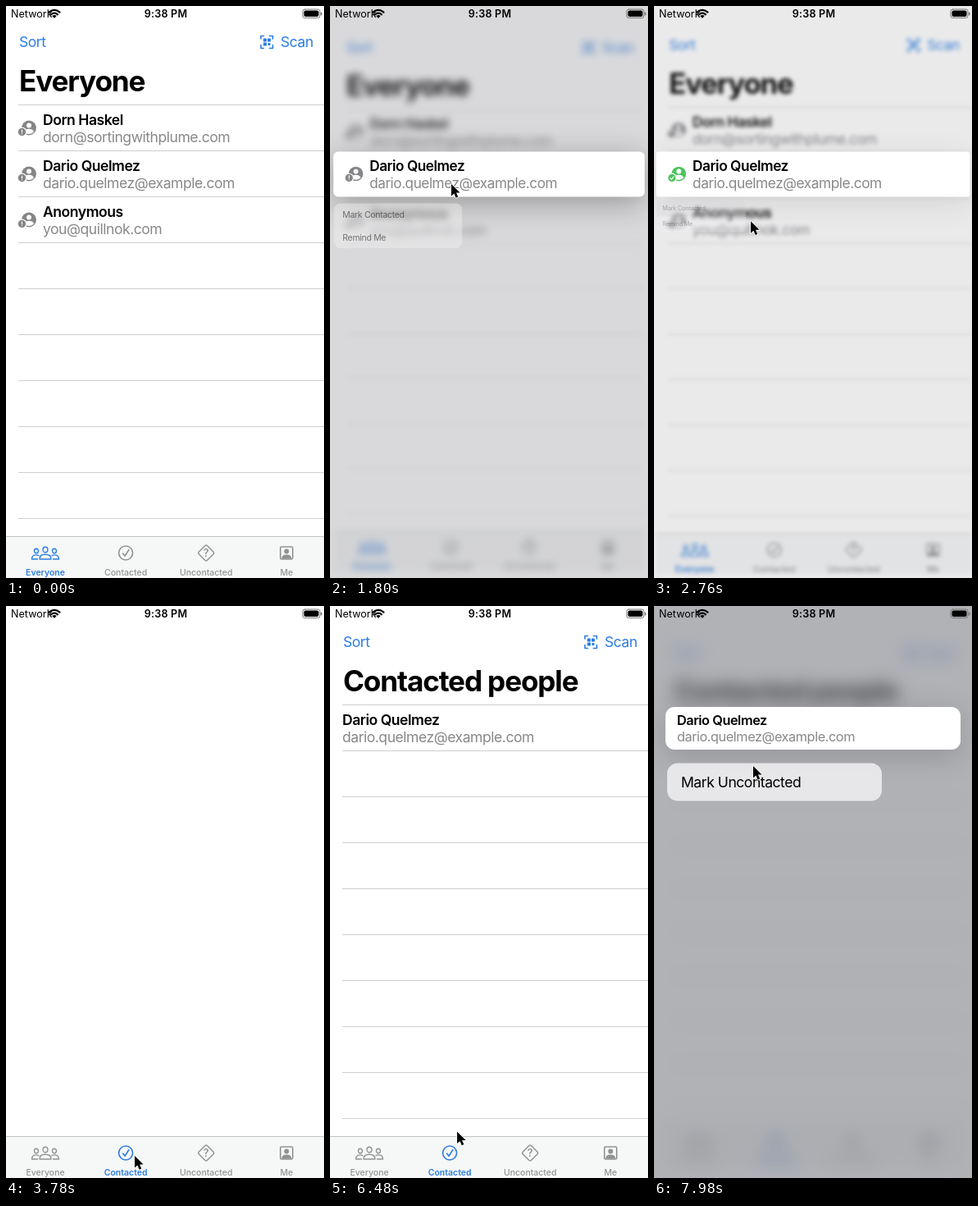
These frames come from a looping animation (388 px wide and 697 px high, 8 s). An HTML page with a canvas:

```html
<!DOCTYPE html>
<html lang="en">
<head>
<meta charset="utf-8">
<title>Contact list</title>
<style>
  html, body { margin: 0; width: 100%; height: 100%; overflow: hidden; background: #fff; }
  canvas { display: block; }
</style>
</head>
<body>
<canvas id="stage" width="388" height="697"></canvas>
<script>
const W = 388, H = 697, LOOP = 8000;
const BLUE = '#2b7de1', GREY = '#929294', GREEN = '#4cc35f';
const ROW_TOP = 121, ROW_H = 56;

const stage = document.getElementById('stage').getContext('2d');
const page = document.createElement('canvas');
page.width = W;
page.height = H;
const pageCtx = page.getContext('2d');
let c = stage;

const dorn = { name: 'Dorn Haskel', mail: 'dorn@sortingwithplume.com' };
const dario = { name: 'Dario Quelmez', mail: 'dario.quelmez@example.com' };
const anonymous = { name: 'Anonymous', mail: 'you@quillnok.com' };

const screens = {
  everyone: { tab: 0, title: 'Everyone', people: [dorn, dario, anonymous], icons: true },
  contacted: { tab: 1, title: 'Contacted people', people: [dario] },
  uncontacted: { tab: 2, title: 'Uncontacted people', people: [dorn, anonymous] }
};

// Time, x and y of the pointer tip
const pointerPath = [
  [300, 170, 720], [1000, 148, 217], [1950, 148, 217], [2380, 118, 262],
  [2750, 118, 262], [3400, 157, 670], [4250, 157, 670], [4600, 201, 667],
  [6000, 201, 667], [6250, 157, 669], [6420, 157, 669], [6850, 122, 147],
  [7520, 122, 147], [7880, 121, 195]
];
const holds = [[1250, 1740], [2450, 2545], [3670, 3765], [4600, 4695], [6200, 6295], [6930, 7400]];

const lerp = (a, b, p) => a + (b - a) * p;
const ramp = (t, a, b) => Math.min(1, Math.max(0, (t - a) / (b - a)));
const smooth = p => p * p * (3 - 2 * p);
const easeOut = p => 1 - (1 - p) ** 3;

function text(str, x, y, size, { weight = 400, color = '#000', track = -0.028, align = 'left' } = {}) {
  c.font = `${weight} ${size}px Inter, sans-serif`;
  c.letterSpacing = `${track * size}px`;
  c.textAlign = align;
  c.fillStyle = color;
  c.fillText(str, x, y);
}

function box(x, y, w, h, r, color) {
  c.beginPath();
  c.roundRect(x, y, w, h, r);
  c.fillStyle = color;
  c.fill();
}

function disc(x, y, r, color) {
  c.beginPath();
  c.arc(x, y, r, 0, 7);
  c.fillStyle = color;
  c.fill();
}

function stroke(d, color, width = 1.5) {
  c.strokeStyle = color;
  c.lineWidth = width;
  c.lineCap = c.lineJoin = 'round';
  c.stroke(new Path2D(d));
}

function fill(d, color) {
  c.fillStyle = color;
  c.fill(new Path2D(d));
}

// Runs a drawing with its own origin and scale
function at(x, y, scale, draw) {
  c.save();
  c.translate(x, y);
  c.scale(scale, scale);
  draw();
  c.restore();
}

function statusBar() {
  text('Network', 6, 14, 12.6, { track: 0 });
  text('9:38 PM', 195, 14, 12.6, { weight: 600, track: 0.015, align: 'center' });
  stroke('M52.5 7.6Q59 2 65.5 7.6M55 10.4Q59 7 63 10.4', '#000', 2.2);
  fill('M56.4 12Q59 10 61.6 12L59 15Z', '#000');
  stroke('M364.5 4H380.5Q383 4 383 6.5V12Q383 14.5 380.5 14.5H364.5Q362 14.5 362 12V6.5Q362 4 364.5 4', '#777', 1);
  box(363.5, 5.5, 18, 7.5, 2, '#000');
  box(384, 7.5, 1.5, 4, 1, '#777');
}

function personIcon(contacted) {
  const color = contacted ? GREEN : '#858587';
  disc(28, 27.5, 9, color);
  disc(28, 24.5, 3, '#fff');
  fill('M22 32.5Q23 28.8 28 28.8Q33 28.8 34 32.5Q31 35 28 35Q25 35 22 32.5Z', '#fff');
  disc(19.5, 32.5, 5.9, '#fff');
  disc(19.5, 32.5, 4.7, color);
  stroke(contacted ? 'M17.4 32.7L19 34.4L21.7 30.8' : 'M19.5 30V32.9M19.5 34.9V35', '#fff', 1.2);
}

// One list row with its own top left corner as origin
function row(person, icons, contacted) {
  const x = icons ? 45 : 15;
  if (icons) personIcon(contacted);
  text(person.name, x, 23.5, 17.6, { weight: 600 });
  text(person.mail, x, 45, 17.6, { color: '#88888b' });
}

const tabIcons = [
  color => {
    for (const x of [-11, 11]) {
      stroke(`M${x - 2.5} -2.5a2.5 2.7 0 1 0 5 0a2.5 2.7 0 1 0 -5 0`, color, 1.4);
    }
    stroke('M-3 -4a3 3.3 0 1 0 6 0a3 3.3 0 1 0 -6 0M-7 7.5Q-7 1.8 0 1.8Q7 1.8 7 7.5Z', color, 1.4);
    stroke('M-9.5 7.5H-16.5Q-16.5 2.4 -11 2.4Q-9 2.4 -8 3.2M9.5 7.5H16.5Q16.5 2.4 11 2.4Q9 2.4 8 3.2', color, 1.4);
  },
  color => stroke('M-8.5 0a8.5 8.5 0 1 0 17 0a8.5 8.5 0 1 0 -17 0M-3.5 .7L-1 3.7L3.7 -3.7', color, 1.6),
  color => {
    stroke('M-1.2 -9Q0 -10 1.2 -9L9 -1.2Q10 0 9 1.2L1.2 9Q0 10 -1.2 9L-9 1.2Q-10 0 -9 -1.2Z', color);
    text('?', 0, 4.5, 12.5, { weight: 600, color, track: 0, align: 'center' });
  },
  color => {
    stroke('M-6 -7.5H6Q7.5 -7.5 7.5 -6V6Q7.5 7.5 6 7.5H-6Q-7.5 7.5 -7.5 6V-6Q-7.5 -7.5 -6 -7.5Z', color, 1.6);
    disc(0, -2, 3, color);
    fill('M-6 7Q-6 2 0 2Q6 2 6 7Z', color);
  }
];

function tabBar(active) {
  box(0, 646, W, 51, 0, '#f6f7f7');
  box(0, 646, W, 1, 0, '#c4c4c6');
  ['Everyone', 'Contacted', 'Uncontacted', 'Me'].forEach((label, i) => {
    const x = 48 + i * 98.1, color = i === active ? BLUE : GREY;
    at(x, 666.5, 1, () => tabIcons[i](color));
    text(label, x, 694, 10.5, { weight: i === active ? 600 : 500, color, track: 0, align: 'center' });
  });
}

function screenPage(screen, blank, lifted, contacted) {
  box(0, 0, W, H, 0, '#fff');
  tabBar(screen.tab);
  if (blank) return;
  text('Sort', 16, 49.5, 17.6, { color: BLUE });
  text('Scan', 335, 49.5, 17.6, { color: BLUE });
  stroke('M311 40V36.5H314.5M321.5 36.5H325.5V40M325.5 47.5V51.5H321.5M314.5 51.5H311V47.5', BLUE, 1.6);
  for (const [x, y] of [[314, 39.5], [319, 39.5], [314, 44.5]]) box(x, y, 4, 4, 0.5, BLUE);
  box(319.5, 45, 3, 3, 0.5, BLUE);
  text(screen.title, 16, 104, 35.2, { weight: 700, track: -0.033 });
  for (let i = 0; i < 10; i++) box(15, 120 + i * ROW_H, W - 15, 1, 0, '#cfcfd1');
  screen.people.forEach((person, i) => {
    if (i === lifted) return;
    at(0, ROW_TOP + i * ROW_H, 1, () => row(person, screen.icons, contacted && person === dario));
  });
}

function menu(items, x, y, p, hover) {
  c.globalAlpha = p;
  at(x, y, lerp(0.2, 1, p), () => {
    const h = items.length * 46;
    box(0, 0, 262, h, 13, 'rgba(242,242,243,.84)');
    if (hover) box(0, 0, 262, 46, [13, 13, 0, 0], 'rgba(0,0,0,.11)');
    if (items.length > 1) box(0, 45.5, 262, 0.7, 0, 'rgba(0,0,0,.1)');
    items.forEach((label, i) => text(label, 17, 29.5 + i * 46, 17.6));
  });
  c.globalAlpha = 1;
}

function liftedRow(screen, index, press, open, contacted) {
  const scale = lerp(lerp(1, 1.028, press), 0.928, open);
  const middle = ROW_TOP + (index + 0.5) * ROW_H;
  const left = W / 2 * (1 - scale), top = middle - ROW_H / 2 * scale;
  at(left, top, scale, () => {
    c.shadowColor = `rgba(0,0,0,${0.42 * press * (1 - 0.6 * open)})`;
    c.shadowBlur = 38;
    c.shadowOffsetY = 8;
    box(0, 0, W, ROW_H, 12 * open, '#fff');
    c.shadowColor = 'transparent';
    row(screen.people[index], screen.icons, contacted);
  });
  return { left, bottom: top + ROW_H * scale };
}

function pointer(t) {
  if (t < pointerPath[0][0]) return;
  const next = pointerPath.findIndex(k => k[0] > t);
  const b = next < 0 ? pointerPath.at(-1) : pointerPath[next];
  const a = next < 0 ? b : pointerPath[next - 1];
  const p = a === b ? 0 : smooth(ramp(t, a[0], b[0]));
  at(lerp(a[1], b[1], p), lerp(a[2], b[2], p), 1, () => {
    if (holds.some(([from, to]) => t >= from && t < to)) {
      stroke('M-20 1a20 20 0 1 0 40 0a20 20 0 1 0 -40 0', '#000', 2.8);
    }
    const arrow = 'M0 0V14.5L3.4 11.5L5.7 16.7L8.3 15.6L6 10.5H10.6Z';
    stroke(arrow, '#fff', 1.6);
    fill(arrow, '#000');
  });
}

function draw(t) {
  const screen = t < 3770 ? screens.everyone
    : t >= 4700 && t < 6300 ? screens.uncontacted : screens.contacted;
  const blank = (t >= 3770 && t < 3830) || (t >= 4700 && t < 4760);
  const contacted = t >= 2540;
  const first = t < 4000;
  const closing = smooth(ramp(t, 2550, 2870));
  const press = first ? smooth(ramp(t, 1300, 1700)) * (1 - closing) : smooth(ramp(t, 6960, 7360));
  const open = first ? easeOut(ramp(t, 1740, 2040)) * (1 - closing) : easeOut(ramp(t, 7390, 7690));
  const lifted = press > 0 ? (first ? 1 : 0) : -1;

  c = pageCtx;
  screenPage(screen, blank, lifted, contacted);

  c = stage;
  c.fillStyle = '#fff';
  c.fillRect(0, 0, W, H);
  if (open > 0) {
    c.filter = `blur(${10 * open}px)`;
    at(W / 2, H / 2, 1 - 0.045 * open, () => c.drawImage(page, -W / 2, -H / 2));
    c.filter = 'none';
    box(0, 0, W, H, 0, `rgba(112,113,120,${0.54 * open})`);
  } else {
    c.drawImage(page, 0, 0);
  }
  if (lifted >= 0) {
    const { left, bottom } = liftedRow(screen, lifted, press, open, contacted);
    const items = first ? ['Mark Contacted', 'Remind Me'] : ['Mark Uncontacted'];
    if (open > 0) menu(items, left + 2 * open, bottom + 16.5 * open, open, first && t >= 2300);
  }
  statusBar();
  pointer(t);
}

function tick() {
  draw(performance.now() % LOOP);
  requestAnimationFrame(tick);
}
tick();
</script>
</body>
</html>
```
